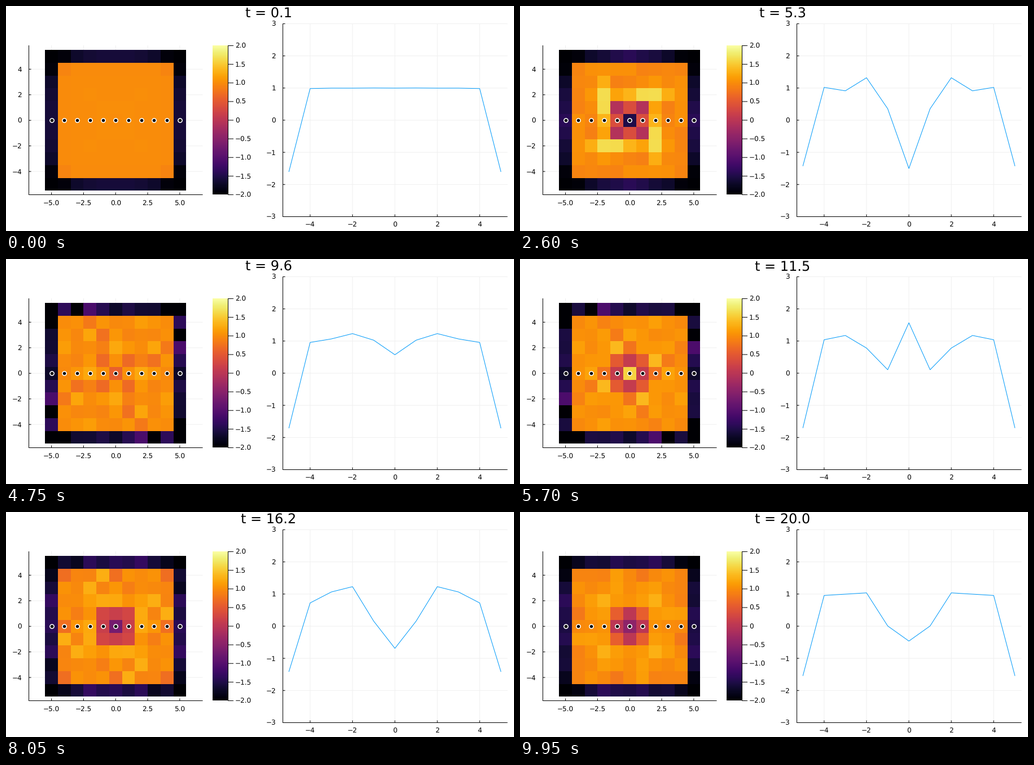
A matplotlib script that plays this animation: 900x400 px, repeating every 10 s.

```python
import itertools

import matplotlib.pyplot as plt
import numpy as np
from matplotlib.animation import FuncAnimation

W, H, FRAMES = 900, 400, 200
PT = 0.72  # points per pixel at 100 dpi
N = 11
MINUS = "\u2212"
plt.rcParams["font.family"] = "DejaVu Sans"
plt.rcParams["text.hinting"] = "none"

# --- Chern insulator on a square lattice, mass quench in the central 3x3 ---

SX = np.array([[0, 1], [1, 0]], complex)
SY = np.array([[0, -1j], [1j, 0]])
SZ = np.diag([1, -1]).astype(complex)
YY, XX = np.mgrid[-5:6, -5:6]
X, Y = (np.repeat(c.ravel(), 2)[:, None].astype(np.float32) for c in (XX, YY))
CORE = (abs(XX) < 2) & (abs(YY) < 2)

# Key points (t, x, y, marker) that settle the core mass and the handedness
KEYS = [(5.3, 0, 0, -1.5), (7.8, 0, 0, 0.63), (11.5, 0, 0, 1.57),
        (11.5, 2, 1, 1.35), (11.5, 1, 2, 0.75), (20.0, 0, 0, -0.46)]
CORE_MASSES = (-1, 3, -3, -2, 0, 2, 5)


def hamiltonian(mass):
    one, step = np.eye(N), np.eye(N, k=1)
    hop = (np.kron(np.kron(one, step), (SZ - 1j * SX) / 2)
           + np.kron(np.kron(step, one), (SZ - 1j * SY) / 2))
    return np.kron(np.diag(mass.ravel()), SZ) + hop + hop.conj().T


def marker(psi):
    """Local Chern marker of the filled states, indexed [y, x]."""
    bra = psi.conj().T
    xy = (bra @ (X * psi)) @ (bra @ (Y * psi))
    local = ((psi @ xy) * psi.conj()).sum(1).imag
    return 4 * np.pi * local.reshape(N, N, 2).sum(2)


filled = np.linalg.eigh(hamiltonian(np.ones((N, N))))[1][:, :N * N]
filled = filled.astype(np.complex64)
sign = np.sign(marker(filled)[5, 5])


def evolve(core_mass):
    """Return a function giving the marker at time t after the quench."""
    energy, modes = np.linalg.eigh(hamiltonian(np.where(CORE, core_mass, 1.0)))
    modes = modes.astype(np.complex64)
    weights = modes.conj().T @ filled

    def at(t):
        phase = np.exp(-1j * energy * t).astype(np.complex64)
        return sign * marker((modes * phase) @ weights)

    return at


def mirrored(at):
    return lambda t: at(t).T


def misfit(at):
    shown = {t: at(t) for t in {key[0] for key in KEYS}}
    return sum((shown[t][5 + y, 5 + x] - v) ** 2 for t, x, y, v in KEYS)


quenches = [evolve(mass) for mass in CORE_MASSES]
field = min(itertools.chain(quenches, map(mirrored, quenches)), key=misfit)
fields = [field((k + 1) / 10) for k in range(FRAMES)]

# --- Drawing, in pixel coordinates with y downwards ---

CELL = 250 / N
LEFT_X, LEFT_Y = 194.25, 203.25  # centre of the heatmap

fig = plt.figure(figsize=(W / 100, H / 100), dpi=100, facecolor="white")
ax = fig.add_axes([0, 0, 1, 1])
ax.axis("off")


def line(x0, y0, x1, y1, color="black", z=3):
    ax.plot([x0, x1], [y0, y1], color=color, lw=PT, zorder=z, snap=False,
            solid_capstyle="butt")


def label(x, y, text, ha="center"):
    ax.text(x, y + 4.4, text.replace("-", MINUS), fontsize=12 * PT, ha=ha,
            va="baseline")


def frame_axes(left, right, top, bottom, xticks, yticks, label_x, label_y):
    for x, text in xticks:
        line(x, top, x, bottom, "#f0f0f0", 0)
        line(x, bottom, x, bottom - 4)
        label(x, label_y, text)
    for y, text in yticks:
        line(left, y, right, y, "#f0f0f0", 0)
        line(left, y, left + 4, y)
        label(label_x, y, text, "right")
    line(left, top, left, bottom + 0.5)
    line(left - 0.5, bottom, right, bottom)


def plot_x(v):
    return 689 + 37.55 * v


def plot_y(v):
    return 203 - 57.15 * v


frame_axes(40.5, 348.5, 70, 335.5,
           [(LEFT_X + v * CELL, f"{v:.1f}") for v in (-5, -2.5, 0, 2.5, 5)],
           [(LEFT_Y - v * CELL, str(v)) for v in (-4, -2, 0, 2, 4)], 28, 350)
frame_axes(490.5, 888.5, 31.5, 374.5,
           [(plot_x(v), str(v)) for v in (-4, -2, 0, 2, 4)],
           [(plot_y(v), str(v)) for v in range(-3, 4)], 478, 388)

# Cell borders fall on whole pixels
borders = (np.arange(N + 1) - N / 2) * CELL
heat = ax.pcolormesh(np.round(LEFT_X + borders), np.round(LEFT_Y - borders),
                     fields[0], cmap="inferno", vmin=-2, vmax=2,
                     antialiased=False, zorder=1)

ax.imshow(np.linspace(-2, 2, 256)[:, None], extent=(366, 393, 335, 70),
          cmap="inferno", origin="lower", aspect="auto",
          interpolation="nearest", zorder=1)
line(393.5, 70, 393.5, 335.5)
for v in np.arange(-2, 2.1, 0.5):
    y = 203 - v * 66.25
    line(393, y, 403, y)
    label(406, y, f"{v:.1f}" if v else "0", "left")

sites = np.arange(-5, 6)
for radius, color in ((4.4, "white"), (2.8, "black")):
    ax.scatter(LEFT_X + sites * CELL, np.full(N, LEFT_Y),
               s=(2 * radius * PT) ** 2, color=color, lw=0, zorder=4)

curve, = ax.plot([], [], color="#009afa", lw=PT, zorder=4, snap=False)
title = ax.text(465, 21, "", fontsize=24 * PT, ha="center", va="baseline")
ax.set_xlim(0, W)
ax.set_ylim(H, 0)


def update(k):
    heat.set_array(fields[k])
    curve.set_data(plot_x(sites), plot_y(fields[k][5]))
    title.set_text(f"t = {(k + 1) / 10:.1f}")
    return heat, curve, title


anim = FuncAnimation(fig, update, frames=FRAMES, interval=50, repeat=True,
                     repeat_delay=0, blit=False)
plt.show()
```
